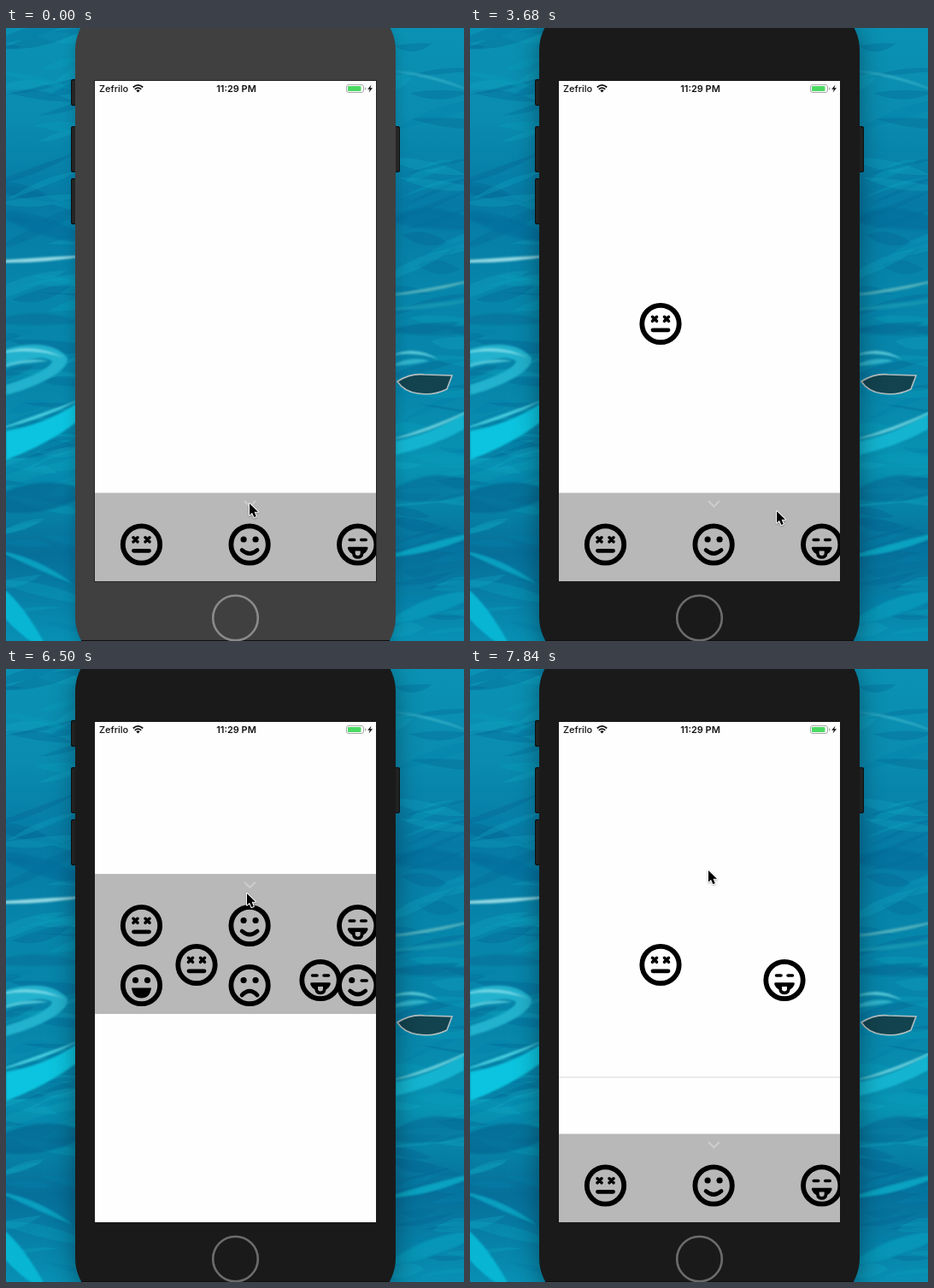
An HTML page with a canvas for the animation above (7.99 s loop, 536 px wide and 718 px high).

```html
<!DOCTYPE html>
<html lang="en">
<head>
<meta charset="utf-8">
<title>Emoji tray</title>
<style>
html, body { margin: 0; width: 100%; height: 100%; overflow: hidden; background: #087fa8; }
canvas { display: block; }
</style>
</head>
<body>
<canvas id="stage" width="536" height="718"></canvas>
<script>
const W = 536, H = 718, LOOP = 7990;
const ctx = document.getElementById('stage').getContext('2d');
const SCREEN = { x: 104, y: 62, w: 329, h: 586 };

function stroke(c, path, color, width) {
  c.strokeStyle = color;
  c.lineWidth = width;
  c.stroke(new Path2D(path));
}
function fill(c, path, color) {
  c.fillStyle = color;
  c.fill(new Path2D(path));
}
function roundRect(c, x, y, w, h, r, color) {
  c.fillStyle = color;
  c.beginPath();
  c.roundRect(x, y, w, h, r);
  c.fill();
}

// Wallpaper: flowing water with foam streaks
function makeWater() {
  const canvas = document.createElement('canvas');
  canvas.width = W;
  canvas.height = H;
  const c = canvas.getContext('2d');
  let seed = 11;
  const rand = () => (seed = seed * 16807 % 2147483647) / 2147483647;
  // A brush mark that tapers at both ends
  const lens = (x, y, dx, dy, bow, thick, color) => fill(c,
    `M${x} ${y}q${dx / 2} ${dy / 2 - bow - thick} ${dx} ${dy}q${-dx / 2} ${-dy / 2 - bow + thick} ${-dx} ${-dy}Z`, color);

  const base = c.createLinearGradient(0, 0, 0, H);
  ['#0a91b3', '#0a8cb0', '#067aa5', '#0786ab', '#0784a9', '#0894b4', '#066f9a', '#0890b4']
    .forEach((color, i) => base.addColorStop(i / 7, color));
  c.fillStyle = base;
  c.fillRect(0, 0, W, H);

  const tones = ['#046a9860', '#0a9dbb60', '#0580aa60', '#04608f50', '#10a6c250'];
  for (let i = 0; i < 150; i++) {
    const dx = 40 + rand() * 80;
    lens((i % 2 ? 425 : -45) + rand() * 100, rand() * H, dx, (0.25 - rand() * 0.7) * dx,
      rand() * 16 - 8, 3 + rand() * 14, tones[i % tones.length]);
  }

  c.filter = 'blur(1.2px)';
  // Left side
  lens(-20, 215, 130, 40, 5, 20, '#056d9c90');
  lens(-30, 274, 130, -8, -3, 5, '#8fd6e0');
  lens(-20, 345, 110, 0, 8, 14, '#08709a90');
  fill(c, 'M0 376Q50 362 72 386Q74 404 20 424L0 430V418Q52 402 54 390Q40 380 0 398Z', '#22b2cd');
  lens(-10, 382, 78, 4, 14, 4, '#70d5e4');
  lens(-10, 398, 60, -8, 6, 4, '#4fc5d8');
  fill(c, 'M0 472Q46 464 82 440V462Q48 488 0 506Z', '#0cc4df');
  lens(-10, 470, 100, -36, -4, 4, '#48cfe0');
  lens(-30, 560, 130, -16, 4, 34, '#05648fa0');
  lens(-40, 640, 90, 90, 8, 34, '#08b6d4');
  lens(-10, 612, 90, 40, 6, 8, '#0a9fbf');

  // Right side
  lens(450, 50, 100, 26, 8, 3, '#2fabc4');
  lens(440, 225, 120, 10, 14, 24, '#056d9a90');
  lens(440, 314, 120, -22, -5, 4, '#4fb0bc');
  lens(440, 330, 120, -14, -4, 6, '#1494b0');
  lens(440, 355, 120, 0, 4, 14, '#06709890');
  lens(450, 384, 56, 4, 12, 4, '#55c6d6');
  lens(450, 396, 46, -6, 4, 6, '#30b2ca');
  fill(c, 'M456 484Q504 474 536 450V470Q500 490 456 500Z', '#14b4d0');
  lens(450, 482, 100, -38, -8, 4, '#62cbd8');
  lens(440, 550, 120, -10, 12, 30, '#066a9690');
  lens(440, 620, 120, -32, -6, 9, '#0aa2c0');
  lens(440, 700, 120, -40, 6, 20, '#0796b8');
  c.filter = 'none';

  const island = 'M458 414Q474 404 490 406L522 407L516 423Q500 431 482 428Q466 426 458 414Z';
  fill(c, island, '#12434f');
  stroke(c, island, '#b5bfc0', 1.6);
  return canvas;
}
const water = makeWater();

function drawPhone(active) {
  const body = active ? '#1a1a1a' : '#404040';
  [[60, 31], [115, 54], [176, 54]].forEach(([y, h]) => {
    roundRect(ctx, 76, y, 8, h, 2, '#101010');
    roundRect(ctx, 77, y + 1, 6, h - 2, 2, '#292929');
  });
  roundRect(ctx, 453, 115, 8, 54, 2, '#101010');
  roundRect(ctx, 454, 116, 6, 52, 2, '#292929');

  ctx.save();
  ctx.shadowColor = active ? 'rgba(0,0,0,.38)' : 'rgba(0,0,0,.2)';
  ctx.shadowBlur = active ? 30 : 16;
  ctx.shadowOffsetY = 8;
  roundRect(ctx, 81, -30, 375, 776, 56, body);
  ctx.restore();

  ctx.fillStyle = '#101010';
  ctx.fillRect(88, 717, 361, 1);
  if (!active) {
    ctx.fillStyle = '#262626';
    ctx.fillRect(SCREEN.x - 1, SCREEN.y - 1, SCREEN.w + 2, SCREEN.h + 2);
  }
  ctx.strokeStyle = active ? '#6c6c6c' : '#8a8a8a';
  ctx.lineWidth = 2.6;
  ctx.beginPath();
  ctx.arc(268.5, 691, 26.3, 0, 7);
  ctx.stroke();
}

function drawStatusBar() {
  ctx.fillStyle = '#111';
  ctx.font = '500 11px Inter, sans-serif';
  ctx.textAlign = 'left';
  ctx.fillText('Zefrilo', 109, 75);
  ctx.font = '600 11px Inter, sans-serif';
  ctx.textAlign = 'center';
  ctx.fillText('11:29 PM', 269.5, 75);

  ctx.lineCap = 'butt';
  stroke(ctx, 'M148.8 69.5Q154.5 64.2 160.2 69.5M150.8 71.8Q154.5 68.4 158.2 71.8', '#111', 1.8);
  fill(ctx, 'M152.3 73.3Q154.5 71.3 156.7 73.3L154.5 75.6Z', '#111');

  ctx.strokeStyle = '#a8a8a8';
  ctx.lineWidth = 1;
  ctx.beginPath();
  ctx.roundRect(398.5, 66.5, 20, 9, 2.5);
  ctx.stroke();
  roundRect(ctx, 400, 68, 15.5, 6, 1, '#4cd964');
  roundRect(ctx, 420, 69.5, 1.3, 3, 0.6, '#a8a8a8');
  fill(ctx, 'M427.5 66.5L423.2 71.8H425.8L424.6 75.5L429 70.2H426.3Z', '#111');
}

// Each face has thick lines, thin lines and filled parts
const dot = x => `M${x - 3.6} -6a3.6 3.6 0 1 0 7.2 0a3.6 3.6 0 1 0 -7.2 0Z`;
const dots = dot(-7) + dot(7);
const cross = x => `M${x - 2.5} -8.2l5 5m0 -5l-5 5`;
const smileLine = 'M-9 6.5Q0 14.5 9 6.5';
const tongueMouth = 'M-10.5 2.8H10.5Q12.5 3 11.5 5.5Q10 9.5 6.6 11Q6 16.8 0 16.8T-6.6 11Q-10 9.5 -11.5 5.5Q-12.5 3 -10.5 2.8Z';
const tongueTip = 'M-3 7.5V10a3 3 0 0 0 6 0V7.5Z';
const faces = {
  dead: { thick: 'M-9 7.3H9', thin: cross(-7) + cross(7) },
  smile: { thick: smileLine, solid: dots },
  tongue: { thin: 'M-9.5 -5.5h5.5M4 -5.5h5.5', solid: tongueMouth + tongueTip },
  grin: { solid: dots + 'M-11.5 3H11.5Q10 15 0 15T-11.5 3Z' },
  frown: { thick: 'M-9 11.5Q0 2 9 11.5', solid: dots },
  wink: { thick: smileLine, thin: 'M4.5 -5.5h6', solid: dot(-7) }
};

function drawFace(name, x, y) {
  const { thick, thin, solid } = faces[name];
  ctx.save();
  ctx.translate(x, y);
  ctx.lineCap = 'round';
  stroke(ctx, 'M-21.7 0a21.7 21.7 0 1 0 43.4 0a21.7 21.7 0 1 0 -43.4 0Z', '#000', 5.8);
  if (thick) stroke(ctx, thick, '#000', 4.8);
  if (thin) stroke(ctx, thin, '#000', 3.6);
  if (solid) {
    ctx.fillStyle = '#000';
    ctx.fill(new Path2D(solid), 'evenodd');
  }
  ctx.restore();
}

function drawTray(top) {
  ctx.fillStyle = '#b8b8b8';
  ctx.fillRect(SCREEN.x, top, SCREEN.w, 164);
  ctx.lineCap = 'round';
  stroke(ctx, `M279.5 ${top + 10}l6 6l6 -6`, '#cdcdcd', 2);
  Object.keys(faces).forEach((name, i) =>
    drawFace(name, 158.5 + 126.6 * (i % 3), top + 60.5 + 70 * Math.floor(i / 3)));
}

function drawCursor(x, y) {
  ctx.save();
  ctx.translate(x, y);
  ctx.lineJoin = 'round';
  const arrow = 'M1 1V14.5L4 11.8L6.4 17L8.8 16L6.6 10.8H11Z';
  ctx.shadowColor = 'rgba(0,0,0,.3)';
  ctx.shadowBlur = 2;
  ctx.shadowOffsetY = 1;
  stroke(ctx, arrow, '#fff', 2);
  ctx.shadowColor = 'transparent';
  fill(ctx, arrow, '#000');
  ctx.restore();
}

const cursorPath = [
  [10, 284, 556], [11, 283, 557], [14, 151, 601], [16, 157, 601], [20, 217, 343], [21, 217, 328],
  [22, 217, 328], [23, 240, 370], [25, 358, 565], [28, 403, 606], [29, 403, 606],
  [30, 376, 525], [31, 360, 367], [32, 322, 272], [34, 322, 272], [35, 318, 330], [37, 300, 537],
  [39, 285, 558], [42, 285, 558], [43, 285, 375], [44, 281, 262], [45, 278, 231],
  [52, 278, 231], [53, 278, 235]
];
const deadPath = [[16, 163, 605], [20, 223, 346.5]];
const tonguePath = [[29, 411.5, 605], [30, 384, 523], [31, 368, 364.5]];
const trayPath = [
  [42, 544.5], [43, 429.5], [44, 240], [45, 40], [46, -200], [47, -120], [48, 80], [49, 314], [50, 544.5]
];

function along(path, tick) {
  const next = path.findIndex(p => p[0] > tick);
  if (next === 0) return path[0].slice(1);
  if (next < 0) return path[path.length - 1].slice(1);
  const a = path[next - 1], b = path[next];
  const u = (tick - a[0]) / (b[0] - a[0]);
  return a.slice(1).map((v, i) => v + (b[i + 1] - v) * u);
}
function tickAt(ms) {
  if (ms < 1620) return 10;
  return ms < 4560 ? 11 + Math.floor((ms - 1620) / 146.5) : 31 + Math.floor((ms - 4560) / 148.9);
}

function render(ms) {
  const tick = tickAt(ms);
  ctx.drawImage(water, 0, 0);
  drawPhone(ms >= 270);

  ctx.save();
  ctx.beginPath();
  ctx.rect(SCREEN.x, SCREEN.y, SCREEN.w, SCREEN.h);
  ctx.clip();
  ctx.fillStyle = '#fefefe';
  ctx.fillRect(SCREEN.x, SCREEN.y, SCREEN.w, SCREEN.h);
  drawStatusBar();
  if (tick >= 50) {
    ctx.fillStyle = '#e4e4e4';
    ctx.fillRect(SCREEN.x, 477.5, SCREEN.w, 1.5);
  }
  drawTray(along(trayPath, tick)[0]);
  if (tick >= 16) drawFace('dead', ...along(deadPath, tick));
  if (tick >= 30) drawFace('tongue', ...along(tonguePath, tick));
  ctx.restore();

  drawCursor(...along(cursorPath, tick));
}

const start = performance.now();
function loop() {
  render((performance.now() - start) % LOOP);
  requestAnimationFrame(loop);
}
loop();
</script>
</body>
</html>
```
